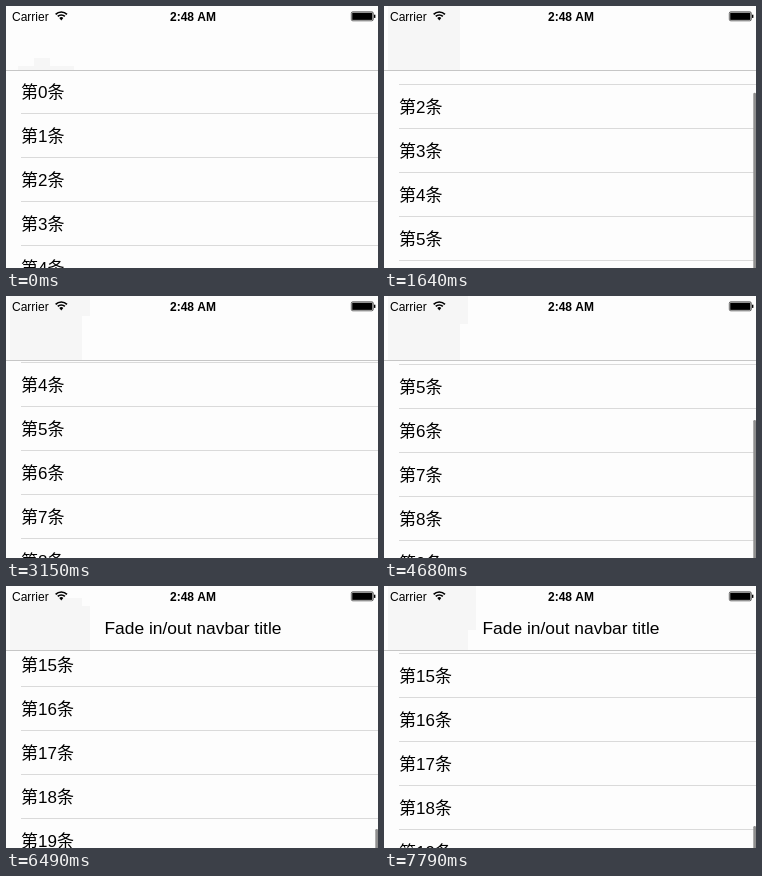
Recreate the animation shown at these times as an HTML page with a canvas. Size 372 by 262 pixels, loop 8000 ms.

```html
<!DOCTYPE html>
<html lang="zh-CN">
<head>
<meta charset="utf-8">
<style>
  html, body { margin: 0; width: 100%; height: 100%; overflow: hidden; background: #fdfdfd; }
  canvas { display: block; }
</style>
</head>
<body>
<canvas id="stage" width="372" height="262"></canvas>
<script>
const W = 372, H = 262, BAR = 64, ROW = 44, LOOP = 8000;
const ctx = document.getElementById('stage').getContext('2d');
const FAMILY = '"Liberation Sans", "Noto Sans CJK SC", "Noto Sans CJK", sans-serif';

// [time in ms, scroll offset]
const keys = [
  [0, 0], [500, 0], [1640, 73], [2680, 173], [4280, 173], [4680, 215], [5080, 285],
  [5370, 287], [5660, 297], [5960, 297], [6490, 667], [6850, 700], [7790, 656], [LOOP, 656]
];

const slope = i => (keys[i + 1][1] - keys[i][1]) / (keys[i + 1][0] - keys[i][0]);

// Monotone tangent: flat at rests and turning points
function tangent(i) {
  if (i === 0 || i === keys.length - 1) return 0;
  const a = slope(i - 1), b = slope(i);
  return a * b > 0 ? 2 * a * b / (a + b) : 0;
}

function scrollAt(t) {
  let i = 0;
  while (i < keys.length - 2 && t >= keys[i + 1][0]) i++;
  const [t0, s0] = keys[i], [t1, s1] = keys[i + 1];
  const d = t1 - t0, u = (t - t0) / d, v = 1 - u;
  return s0 * v * v * (1 + 2 * u) + s1 * u * u * (3 - 2 * u)
    + d * u * v * (tangent(i) * v - tangent(i + 1) * u);
}

function text(str, x, y, size, weight = 'normal') {
  ctx.font = `${weight} ${size}px ${FAMILY}`;
  ctx.fillText(str, x, y);
}

function rect(color, x, y, w, h) {
  ctx.fillStyle = color;
  ctx.fillRect(x, y, w, h);
}

function clipped(y, h, draw) {
  ctx.save();
  ctx.beginPath();
  ctx.rect(0, y, W, h);
  ctx.clip();
  draw();
  ctx.restore();
}

function drawRows(scroll) {
  for (let n = Math.floor(scroll / ROW); n <= (scroll + H) / ROW; n++) {
    const top = BAR + n * ROW - scroll;
    ctx.fillStyle = '#000';
    text(`第${n}条`, 15, top + 28, 17);
    rect('#dadada', 15, top + 43, W - 15, 1);
  }
}

// Rows behind the translucent bar, as a coarse blur
function drawBlur(scroll) {
  const first = Math.max(0, Math.floor(scroll / ROW) - 2);
  for (let y = -4; y < BAR; y += 8) {
    for (let x = 4; x < 110; x += 8) {
      let shade = 0;
      for (let n = first; n < first + 5; n++) {
        const cy = 86 + n * ROW - scroll;
        if (cy < -6) continue;
        const wide = n > 9 ? 5 : 0;
        const dx = (x + 4 - 37 - wide) / (39 + wide), dy = (y + 4 - cy) / 31;
        shade += (cy < 8 ? 2 : 1) * Math.exp(-1.5 * (dx * dx + dy * dy));
      }
      if (shade > 0.223) rect('#f6f6f6', x, y, 8, 8);
    }
  }
}

function drawStatus() {
  ctx.fillStyle = ctx.strokeStyle = '#000';
  text('Carrier', 6, 15, 12);
  text('2:48 AM', 164, 14.5, 12, 'bold');

  const wedge = [-Math.PI * 0.75, -Math.PI * 0.25];
  ctx.lineWidth = 1.7;
  for (const r of [5, 8]) {
    ctx.beginPath();
    ctx.arc(55.3, 14, r, ...wedge);
    ctx.stroke();
  }
  ctx.beginPath();
  ctx.moveTo(55.3, 14.5);
  ctx.arc(55.3, 14, 2.8, ...wedge);
  ctx.fill();

  ctx.lineWidth = 0.6;
  ctx.beginPath();
  ctx.roundRect(345.3, 5.8, 22, 9, 1.5);
  ctx.stroke();
  rect('#000', 346.2, 6.7, 20.2, 7.2);
  rect('#000', 368, 8.7, 1.4, 3.2);
}

function drawTitle(scroll) {
  const shift = Math.max(0, 311 - scroll);
  ctx.globalAlpha = Math.max(0, 1 - shift / 36);
  ctx.fillStyle = '#000';
  text('Fade in/out navbar title', 98.5, 48 + shift, 17.4);
}

function indicatorAlpha(t) {
  if (t < 500) return 0;
  if (t >= 4280) return 1;
  return Math.min(1, Math.max(0, (3150 - t) / 180));
}

function drawIndicator(t, scroll) {
  ctx.globalAlpha = indicatorAlpha(t);
  ctx.fillStyle = '#8e8e8e';
  ctx.beginPath();
  ctx.roundRect(369.3, 67.5 + scroll * 0.263, 2.7, 300, 1.3);
  ctx.fill();
  ctx.globalAlpha = 1;
}

function frame() {
  const t = performance.now() % LOOP;
  const scroll = Math.round(scrollAt(t));
  rect('#fdfdfd', 0, 0, W, H);
  clipped(BAR, H - BAR, () => drawRows(scroll));
  clipped(0, BAR, () => {
    drawBlur(scroll);
    drawStatus();
    drawTitle(scroll);
  });
  rect('#c6c6c6', 0, BAR, W, 1);
  drawIndicator(t, scroll);
  requestAnimationFrame(frame);
}
frame();
</script>
</body>
</html>
```
